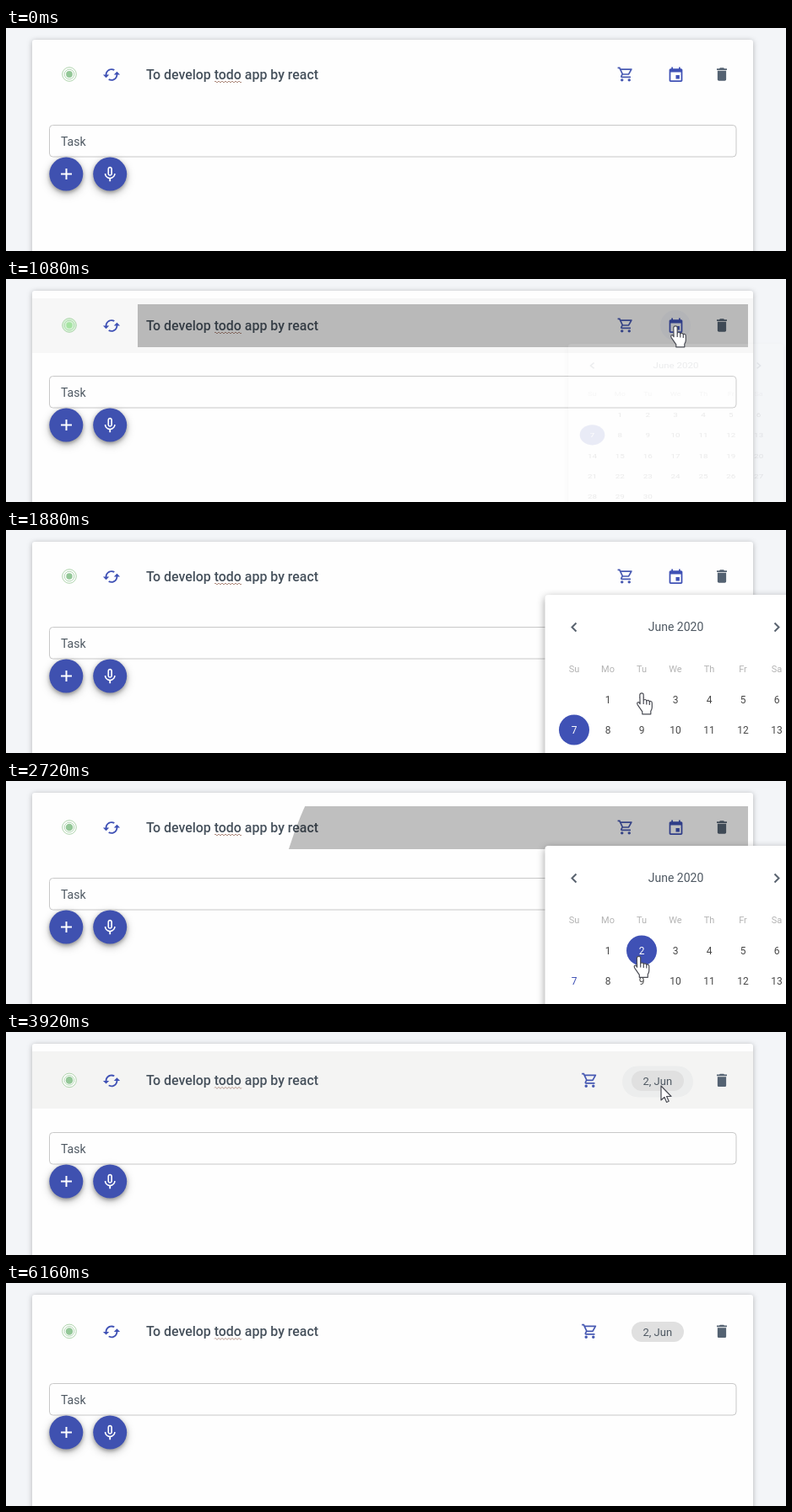
These frames come from a looping animation (924 px wide and 265 px high, 6.2 s). An HTML page:

```html
<!DOCTYPE html>
<html lang="en">
<head>
<meta charset="utf-8">
<title>Todo with date picker</title>
<style>
  html, body { margin: 0; height: 100%; overflow: hidden; background: #f3f5f8; }
  svg { display: block; width: 924px; height: 265px; font: 14px Roboto, sans-serif; fill: #4e5862; }
  #card { fill: #fefefe; filter: drop-shadow(0 1px 3px #0004); }
  #title { font-size: 15.9px; font-weight: 500; fill: #46515c; }
  .fab { fill: #3f51b0; filter: drop-shadow(0 2px 2px #0004) drop-shadow(0 3px 5px #0004); }
  #paper { fill: #fff; filter: drop-shadow(0 3px 5px #0006); }
  #picker { text-anchor: middle; }
  .week { font-size: 11px; fill: #b4b4b4; }
  .day { font-size: 12px; fill: #484848; }
  .line { fill: none; stroke-width: 2; }
  #cursor path { fill: #fff; stroke: #4a4c54; stroke-width: 1.2; stroke-linejoin: round; }
</style>
</head>
<body>
<svg id="stage" viewBox="0 0 924 265"></svg>
<script>
const LOOP = 6200, STEP = 40, BLUE = '#3f51b5';
const ICONS = {
  cached: 'M19 8l-4 4h3c0 3.31-2.69 6-6 6-1.01 0-1.97-.25-2.8-.7l-1.46 1.46C8.97 19.54 10.43 20 12 20c4.42 0 8-3.58 8-8h3l-4-4zM6 12c0-3.31 2.69-6 6-6 1.01 0 1.97.25 2.8.7l1.46-1.46C15.03 4.46 13.57 4 12 4c-4.42 0-8 3.58-8 8H1l4 4 4-4H6z',
  cart: 'M15.55 13c.75 0 1.41-.41 1.75-1.03l3.58-6.49A.996.996 0 0 0 20.01 4H5.21l-.94-2H1v2h2l3.6 7.59-1.35 2.44C4.52 15.37 5.48 17 7 17h12v-2H7l1.1-2h7.45zM6.16 6h12.15l-2.76 5H8.53L6.16 6zM7 18c-1.1 0-1.99.9-1.99 2S5.9 22 7 22s2-.9 2-2-.9-2-2-2zm10 0c-1.1 0-1.99.9-1.99 2s.89 2 1.99 2 2-.9 2-2-.9-2-2-2z',
  event: 'M17 12h-5v5h5v-5zM16 1v2H8V1H6v2H5c-1.11 0-1.99.9-1.99 2L3 19c0 1.1.89 2 2 2h14c1.1 0 2-.9 2-2V5c0-1.1-.9-2-2-2h-1V1h-2zm3 18H5V8h14v11z',
  trash: 'M6 19c0 1.1.9 2 2 2h8c1.1 0 2-.9 2-2V7H6v12zM19 4h-3.5l-1-1h-5l-1 1H5v2h14V4z',
  mic: 'M12 14c1.66 0 2.99-1.34 2.99-3L15 5c0-1.66-1.34-3-3-3S9 3.34 9 5v6c0 1.66 1.34 3 3 3zm-1.2-9.1c0-.66.54-1.2 1.2-1.2s1.2.54 1.2 1.2l-.01 6.2c0 .66-.53 1.2-1.19 1.2s-1.2-.54-1.2-1.2V4.9zm6.5 6.1c0 3-2.54 5.1-5.3 5.1S6.7 14 6.7 11H5c0 3.41 2.72 6.23 6 6.72V21h2v-3.28c3.28-.48 6-3.3 6-6.72h-1.7z'
};
const icon = (name, x, y, size = 21, color = BLUE) =>
  `<path d="${ICONS[name]}" fill="${color}" transform="translate(${x} ${y}) scale(${size / 24}) translate(-12 -12)"/>`;
const label = (text, x, y, cls = '') => `<text x="${x}" y="${y}" class="${cls}">${text}</text>`;

const column = i => 673 + 40 * i;
const weekdays = ['Su', 'Mo', 'Tu', 'We', 'Th', 'Fr', 'Sa'].map((d, i) => label(d, column(i), 169, 'week')).join('');
const days = Array.from({ length: 30 }, (_, i) => {
  const d = i + 1;
  return `<text id="day${d}" class="day" x="${column(d % 7)}" y="${206 + 36 * Math.floor(d / 7)}">${d}</text>`;
}).join('');

document.getElementById('stage').innerHTML = `
  <clipPath id="rowClip"><rect x="156" y="30" width="723" height="51"/></clipPath>
  <rect id="card" x="31" y="14" width="854" height="300" rx="3"/>
  <rect id="hover" x="31" y="23" width="854" fill="#1a1a00"/>
  <g id="row">
    <circle id="halo" cx="75" cy="55" r="8.3" stroke="#b0d5ae"/>
    <circle cx="75" cy="55" r="5.8" fill="none" stroke="#b4d8b5"/>
    <circle id="dot" cx="75" cy="55"/>
    ${icon('cached', 125, 55.5, 22)}
    <text id="title" x="166" y="61">To develop todo app by react</text>
    <path d="M247 64q1-2 2 0${'t2 0'.repeat(15)}" fill="none" stroke="#b08d80"/>
    <g id="cart">${icon('cart', 734, 55, 20.5, '#4759b2')}</g>
    <g id="event"><circle id="eventHover" cx="793" cy="55" r="18" fill="${BLUE}"/>${icon('event', 793.5, 56)}</g>
    <g id="chip">
      <rect id="chipHover" x="730" y="38" width="84" height="37" rx="18.5" fill="#eceded"/>
      <rect x="741" y="43.5" width="62" height="24" rx="12" fill="#e0e0e0"/>
      <text x="754.5" y="60.5" font-size="13">2, Jun</text>
    </g>
    ${icon('trash', 848, 55, 20.5, '#546272')}
  </g>
  <g clip-path="url(#rowClip)"><circle id="ripple"/></g>
  <g id="form">
    <rect x="51.5" y="115.5" width="813.5" height="37.5" rx="4" fill="#fefefe" stroke="#c8c8c8"/>
    ${label('Task', 65, 139.5)}
    <circle class="fab" cx="71.3" cy="173.6" r="20"/>
    <path class="line" stroke="#fff" d="M65 173.6h13m-6.5-6.5v13"/>
    <circle class="fab" cx="123.2" cy="173.6" r="20"/>
    ${icon('mic', 123.2, 174, 22, '#fff')}
  </g>
  <g id="picker">
    <rect id="paper" x="638.5" y="77" width="310" height="305" rx="4"/>
    <path class="line" stroke="#5a6470" d="M675.5 110.5l-5 5 5 5m235-10l5 5-5 5"/>
    ${label('June 2020', 793.5, 120)}${weekdays}
    <circle id="selected" r="18" fill="${BLUE}"/>${days}
  </g>
  <g id="cursor">
    <path id="arrow" d="M0 0v17l4-3.5 2.6 6 2.6-1.2-2.6-5.8h5.4z"/>
    <path id="hand" d="M-2.2 2a2.2 2.2 0 0 1 4.4 0v7q0-1.5 1.8-1.5t1.8 2q.2-1.3 1.8-1.2t1.7 2q.2-1 1.6-.8t1.4 2.3v5q0 2-1.5 4.5v3.5h-10v-3l-5.5-8q-1.3-2.5 .3-3t2.5 2zM2.2 9v4m3.6-3.5v4m3.5-3v3.5"/>
  </g>`;

const el = Object.fromEntries([...document.querySelectorAll('[id]')].map(e => [e.id, e]));
const set = (id, attrs) => { for (const k in attrs) el[id].setAttribute(k, attrs[k]); };
const show = (id, on) => set(id, { opacity: +on });
const ramp = (t, from, to) => Math.min(1, Math.max(0, (t - from) / (to - from)));
const between = (t, from, to) => t >= from && t < to;

// cubic-bezier(.4, 0, .2, 1)
function ease(x) {
  let lo = 0, hi = 1;
  for (let i = 0; i < 20; i++) {
    const s = (lo + hi) / 2, r = 1 - s;
    if (1.2 * r * r * s + .6 * r * s * s + s ** 3 < x) lo = s; else hi = s;
  }
  return lo * lo * (3 - 2 * lo);
}

// time, x, y of the pointer tip
const POINTER = [
  [40, 640, 177], [640, 793, 56], [1320, 793, 56], [1880, 753, 194], [1960, 753, 194], [2200, 749.5, 208.5],
  [3200, 749.5, 208.5], [3680, 776, 64], [5200, 776, 64], [5360, 435, 205], [5440, 435, 205], [5800, 330, 270]
];
function pointerAt(t) {
  const i = Math.max(1, POINTER.findIndex(p => p[0] > t));
  const [a, b] = [POINTER[i - 1], POINTER[i]];
  const k = ramp(t, a[0], b[0]), s = k * k * (3 - 2 * k);
  return [a[1] + (b[1] - a[1]) * s, a[2] + (b[2] - a[2]) * s];
}

function render(t) {
  const dated = t >= 2940;
  const visible = between(t, 40, 5800);
  show('cursor', visible);
  if (visible) set('cursor', { transform: `translate(${pointerAt(t)})` });
  const pointing = between(t, 520, 3240);
  show('hand', pointing);
  show('arrow', !pointing);

  set('row', { transform: `translate(0 ${dated ? 2.4 : 0})` });
  set('form', { transform: `translate(0 ${dated ? 4 : 0})` });
  set('cart', { transform: `translate(${dated ? -42.5 : 0} 0)` });
  show('event', !dated);
  show('chip', dated);
  const hover = ramp(t, 600, 720) - ramp(t, 1020, 1160) + ramp(t, 3520, 3640) - ramp(t, 5240, 5390);
  set('hover', { height: dated ? 68 : 65, opacity: .045 * hover });
  set('eventHover', { opacity: .04 * (ramp(t, 600, 720) - ramp(t, 1160, 1300)) });
  set('chipHover', { opacity: ramp(t, 3560, 3680) - ramp(t, 5230, 5380) });

  const pressed = between(t, 720, 1600);
  set('halo', { fill: pressed ? '#d6f3d5' : '#fefefe' });
  set('dot', { r: 3.9 + .4 * Math.sin(t / 190), fill: pressed ? '#a5e3a2' : '#93c797' });

  const second = t > 2000;
  const start = second ? 2580 : 720;
  const fade = second ? ramp(t, 2880, 3080) : ramp(t, 1300, 1600);
  const [cx, cy] = second ? [749, 208] : [793, 56];
  set('ripple', { cx, cy, r: 680 * ease(ramp(t, start, start + 340)), fill: '#000', opacity: .25 * (1 - fade) });

  const closing = t > 2940, from = closing ? 2940 : 1035;
  const opacity = ease(ramp(t, from, from + 250));
  const grow = closing ? 1 - ease(ramp(t, from + 100, from + 267)) : ease(ramp(t, from, from + 167));
  const scale = .75 + .25 * grow;
  set('picker', {
    opacity: closing ? 1 - opacity : opacity,
    transform: `translate(793.5 77) scale(${scale} ${scale * scale}) translate(-793.5 -77)`
  });
  const picked = t >= 2640;
  set('selected', picked ? { cx: column(2), cy: 201.5 } : { cx: column(0), cy: 237.5 });
  el.day2.style.fill = picked ? '#fff' : '';
  el.day7.style.fill = picked ? BLUE : '#fff';
}

function tick() {
  render(Math.floor(performance.now() % LOOP / STEP) * STEP);
  requestAnimationFrame(tick);
}
tick();
</script>
</body>
</html>
```
